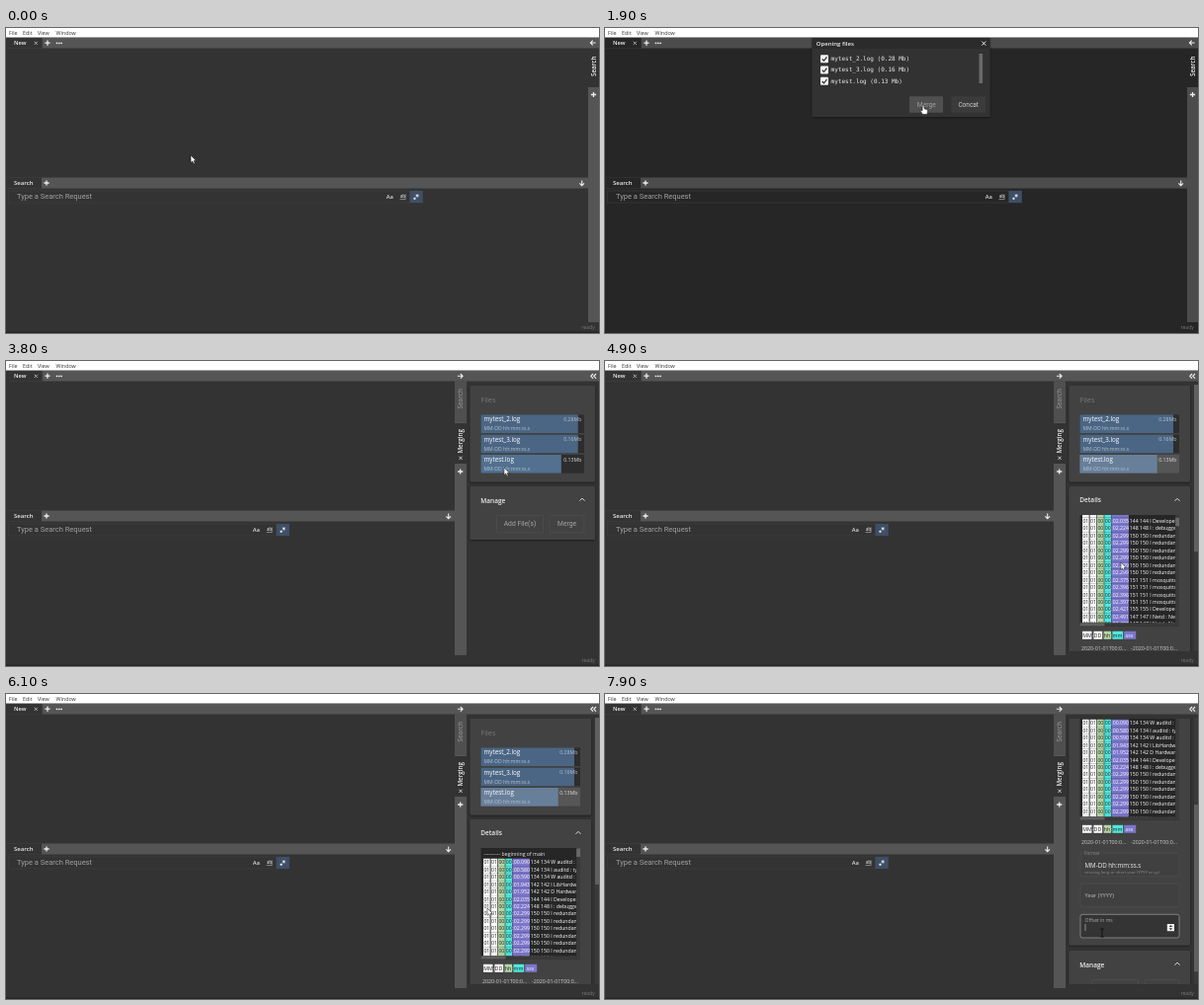
Write an HTML page that moves like this. It is 600 px wide and 309 px high and loops after 8 s.

```html
<!DOCTYPE html>
<html lang="en">
<head>
<meta charset="utf-8">
<title>Log merging</title>
<style>
html, body { margin: 0; width: 100%; height: 100%; overflow: hidden; background: #333; }
svg { display: block; width: 100vw; height: 100vh; }
text { font-family: "Open Sans", "Noto Sans", sans-serif; white-space: pre; }
.rb { font-family: Roboto, sans-serif; }
.mono { font-family: "DejaVu Sans Mono", monospace; }
</style>
</head>
<body>
<svg id="stage" viewBox="0 0 600 309" preserveAspectRatio="none">
  <defs>
    <clipPath id="panelClip"><rect x="467" y="25" width="133" height="269"/></clipPath>
    <clipPath id="logClip"><rect x="480.5" y="156" width="96.7" height="109.5"/></clipPath>
    <filter id="shadow" x="-10%" y="-10%" width="120%" height="125%">
      <feDropShadow dx="0" dy="1" stdDeviation="1.3" flood-opacity=".45"/>
    </filter>
  </defs>
  <g id="scene"></g>
</svg>
<script>
const LOOP = 8000, STEP = 100;
const scene = document.getElementById('scene');

// time, value(s) keyframes
const POINTER = [
  [0, 187, 129], [400, 272, 112], [800, 272, 112], [1600, 269, 102], [1900, 322, 78],
  [2700, 322, 78], [3500, 568, 80], [3700, 533, 114], [3800, 504, 108], [4000, 504, 108],
  [4800, 523, 206], [4900, 522, 204], [5700, 496, 216], [6100, 487, 217],
  [6800, 476.5, 210], [7500, 478, 212], [7900, 503, 242]
];
const LOG_SCROLL = [[4600, 0], [4900, 45.7], [5300, 130], [5800, 0]];
const PANEL_SCROLL = [[6200, 0], [6800, 94], [6900, 94], [7500, 141]];
const DIM = [[800, 0], [1100, 1]];

const ease = u => u * u * (3 - 2 * u);
function at(keys, t) {
  let i = keys.findIndex(k => k[0] > t);
  if (i < 0) return keys[keys.length - 1].slice(1);
  if (i === 0) return keys[0].slice(1);
  const a = keys[i - 1], b = keys[i], u = ease((t - a[0]) / (b[0] - a[0]));
  return a.slice(1).map((v, j) => v + (b[j + 1] - v) * u);
}

const rect = (x, y, w, h, fill, more = '') =>
  `<rect x="${x}" y="${y}" width="${w}" height="${h}" fill="${fill}" ${more}/>`;
// y is the middle of the line
const text = (s, x, y, size, fill, more = '') =>
  `<text x="${x}" y="${y + size * 0.36}" font-size="${size}" fill="${fill}" ${more}>${s}</text>`;
const line = (d, color = '#eee', w = 1, more = '') =>
  `<path d="${d}" fill="none" stroke="${color}" stroke-width="${w}" ${more}/>`;
const group = (s, attrs) => `<g ${attrs}>${s}</g>`;
const gray = v => `rgb(${v},${v},${v})`;
const semi = 'font-weight="600"';
const rb = 'class="rb"';

const plus = (x, y) => line(`M${x - 2.6} ${y}h5.2M${x} ${y - 2.6}v5.2`, '#eee', 1.3);
const cross = (x, y, r = 1.6, c = '#ddd') =>
  line(`M${x - r} ${y - r}l${2 * r} ${2 * r}m0 ${-2 * r}l${-2 * r} ${2 * r}`, c, 0.9);
const arrow = (x, y, turn) =>
  group(line('M-2.6 0h5.2M.3-2.3l2.3 2.3l-2.3 2.3', '#eee', 1.1), `transform="translate(${x} ${y}) rotate(${turn})"`);
const chevron = (x, y) => line(`M${x - 2.5} ${y + 1.3}l2.5-2.5l2.5 2.5`, '#ddd', 1);
const upText = (s, x, y, size, fill) =>
  group(text(s, 0, 0, size, fill, semi), `transform="translate(${x} ${y}) rotate(-90)"`);

function menuBar() {
  const items = [['File', 3], ['Edit', 17], ['View', 32], ['Window', 50.5]];
  return rect(0, 0, 600, 9.5, '#fff') + items.map(([s, x]) => text(s, x, 4.8, 5.4, '#333')).join('');
}

function searchBar(right, barEnd, bg, bar) {
  return rect(0, 151.5, barEnd, 11, bar) + rect(0, 151.5, 36, 11, bg) +
    text('Search', 8, 156.6, 6, '#eee', semi) + plus(41, 157) + arrow(barEnd - 6.3, 157, 90) +
    rect(2.5, 165, right - 2.5, 12, bg, 'stroke="#3e3e3e" stroke-width=".6"') +
    text('Type a Search Request', 11, 170.5, 7.5, '#a2a2a2', rb) +
    text('Aa', right - 37, 171.2, 5.8, '#ddd', semi) +
    text('ab', right - 23, 170.4, 4.6, '#ccc', semi) +
    line(`M${right - 23.2} 173.6h5.6v-5.2`, '#bbb', 0.6) +
    rect(right - 13.3, 165, 13.3, 12, '#3e4f66') +
    rect(right - 9.2, 171.8, 1.9, 1.9, '#fff') +
    line(`M${right - 5.6} 168.2v3.4M${right - 7.1} 169l3 1.7M${right - 4.1} 169l-3 1.7`, '#fff', 0.7);
}

function shell(open, dim) {
  const edge = open ? 454 : 589, bg = gray(51 - 13 * dim), bar = gray(85 - 9 * dim);
  let s = rect(0, 9.5, 600, 299.5, bg) + rect(0, 9.5, 600, 11, bar) + rect(0, 9.5, 36.7, 11, bg) +
    text('New', 8, 14.6, 5.8, '#eee', semi) + cross(30.3, 15.3, 1.6, '#bbb') + plus(42, 15.2) +
    [51.5, 53.8, 56.1].map(x => `<circle cx="${x}" cy="15.3" r=".9" fill="#eee"/>`).join('');
  s += searchBar(open ? 286.7 : 421.7, edge, bg, bar);
  if (open) {
    s += rect(454, 20.5, 12, 277.5, bar) + rect(454, 20.5, 12, 41.5, '#4f4f4f') + rect(454, 63, 12, 41, bg) +
      upText('Search', 460, 48.5, 6.3, '#8c8c8c') + upText('Merging', 460, 93.6, 6.2, '#eee') +
      cross(460, 98.3) + plus(459.7, 112) + arrow(459.5, 15.3, 0) +
      line('M594 13l-2.2 2.3l2.2 2.3M597 13l-2.2 2.3l2.2 2.3', '#eee', 1.2);
  } else {
    s += rect(589, 9.5, 11, 288.5, bar) + rect(589, 20.5, 11, 39.5, bg) +
      upText('Search', 595, 49, 6.3, '#eee') + plus(594.5, 67.5) + arrow(594, 15, 180);
  }
  return s + text('ready', 582.5, 303.6, 5.1, '#777') + rect(0, 307.6, 600, 1.4, '#262626');
}

function dialog(hover) {
  const files = ['mytest_2.log (0.28 Mb)', 'mytest_3.log (0.16 Mb)', 'mytest.log (0.13 Mb)'];
  let s = group(rect(209.5, 9.5, 180, 80.5, '#333'), 'filter="url(#shadow)"') +
    rect(209.5, 9.5, 180, 11.5, '#2b2b2b') +
    text('Opening files', 213.8, 15.4, 6, '#eee', semi) + cross(383.3, 15.6, 2, '#fff');
  files.forEach((f, i) => {
    const y = 31.2 + i * 11.3;
    s += rect(218, y - 4, 8, 8, '#f4f4f4', 'rx="1"') +
      line(`M219.7 ${y + 0.2}l1.8 1.8l3-3.8`, '#222', 1.1) + text(f, 228.6, y - 0.2, 6, '#eee', 'class="mono"');
  });
  return s + rect(378.5, 26, 3.6, 30, '#6a6a6a') +
    rect(308, 69.3, 34, 16.5, hover ? '#505050' : '#3b3b3b', 'rx="1"') +
    rect(350.5, 69.3, 34.5, 16.5, '#3b3b3b', 'rx="1"') +
    text('Merge', 315.8, 77.5, 6.7, hover ? '#a0a0a0' : '#ccc', rb) + text('Concat', 357.4, 77.5, 6.5, '#ccc', rb);
}

const card = (y, h, right) =>
  group(rect(469.5, y, right - 469.5, h, '#424242', 'rx="1.5"'), 'filter="url(#shadow)"');

function fileCard(right, picked, hover) {
  const w = right - 491.5, end = 480.5 + w;
  const rows = [['mytest_2.log', '0.28Mb', 0.94], ['mytest_3.log', '0.16Mb', 0.94], ['mytest.log', '0.13Mb', 0.778]];
  return card(24, 98.5, right) + text('Files', 480.5, 39.5, 7.2, '#7a7a7a') + rows.map(([name, size, part], i) => {
    const y = 54.4 + i * 20.3, last = i === 2;
    const fill = last && picked ? '#687f9a' : last && hover ? '#52708f' : '#4b6684';
    return rect(480.5, y, w, 18.6, last && picked ? '#565656' : '#2d2d2d') + rect(480.5, y, w * part, 18.6, fill) +
      text(name, 483.5, y + 4.6, 6.25, '#fff') + text('MM-DD hh:mm:ss.s', 483.5, y + 14.2, 5.1, '#b4c1cf') +
      text(size, end - 2.6, y + 4.8, 5.2, last ? '#ddd' : '#b4c0cc', 'text-anchor="end"');
  }).join('');
}

function manageCard(y, right) {
  const b = (x, w, s, size) => rect(x, y + 29.5, w, 17.3, 'none', 'rx="1" stroke="#4e4e4e" stroke-width=".8"') +
    text(s, x + w / 2, y + 38, size, '#a6a6a6', rb + ' text-anchor="middle"');
  return card(y, 54, right) + text('Manage', 480.3, y + 14.2, 6.5, '#eee', semi) + chevron(right - 13, y + 13.3) +
    b(right - 99.5, 47, 'Add File(s)', 6.8) + b(right - 45.8, 34.6, 'Merge', 6.7);
}

const LOG = [
  ['00.090', '134 134 W auditd :'], ['00.580', '134 134 I auditd : type'], ['00.590', '134 134 W auditd :'],
  ['01.943', '142 142 I LibHardware'], ['01.952', '142 142 D Hardware'],
  ['02.035', '144 144 I Developer'], ['02.224', '148 148 I : debuggerd'],
  ...Array(6).fill(['02.299', '150 150 I redundant']), ['02.375', '151 151 I mosquitto'],
  ['02.396', '151 151 I mosquitto'], ['02.396', '151 151 I mosquitto'], ['02.397', '151 151 I mosquitto'],
  ['02.421', '155 155 I Developer'],
  ...Array.from({ length: 22 }, (_, i) => ['02.' + (491 + i * 7), '147 147 I Netd : Netd'])
];
const WHITE = '#fafafa', GREEN = '#b4d5a4', CYAN = '#4fe8dc', PURPLE = '#7b76cb';
const COLS = [[483, WHITE, '01'], [490.6, WHITE, '01'], [498, GREEN, '00'], [505.3, CYAN, '00']];

function logView(scroll) {
  let s = text('---------- beginning of main', 483.5, 162.6 - scroll, 5.2, '#eee');
  LOG.forEach(([sec, msg], i) => {
    const y = 170.5 + i * 7.47 - scroll, ty = y - 0.2;
    if (y < 150 || y > 272) return;
    s += COLS.map(([x, c, v]) => rect(x, y - 3.75, 6.7, 7.5, c) + text(v, x + 0.4, ty, 5.2, '#222')).join('') +
      rect(512.4, y - 3.75, 17.5, 7.5, PURPLE) + text(':' + sec, 512.3, ty, 5.2, '#fff') +
      text(msg, 530.8, ty, 5.2, '#fff');
  });
  return rect(480.5, 156, 100.5, 112.5, '#262626') + group(s, 'clip-path="url(#logClip)"') +
    rect(577.2, 156, 3.8, 112.5, '#3a3a3a') + rect(577.2, 156.5 + scroll * 0.05, 3.8, 8.5, '#686868') +
    rect(480.5, 265.5, 96.7, 3, '#3a3a3a') + rect(480.5, 265.5, 25, 3, '#606060');
}

function detailsCard(scroll, focus) {
  const pills = [[483, 9.5, WHITE, 'MM'], [494.4, 8.8, WHITE, 'DD'], [504.6, 7.5, GREEN, 'hh'],
    [513.4, 10.8, CYAN, 'mm'], [525.2, 12, PURPLE, '.sss']];
  const box = (y, h) => rect(481, y, 100, h, '#404040', 'rx="2" stroke="#4d4d4d" stroke-width=".8"');
  let s = card(127, 268.5, 592) + text('Details', 480.3, 141, 6.5, '#eee', semi) + chevron(579, 140.5) +
    logView(scroll) + text('-', 492.5, 277.6, 5.3, '#eee') + text(':', 512, 277.6, 5.3, '#eee') +
    pills.map(([x, w, c, v], i) => rect(x, 273.8, w, 8, c) + text(v, x + 0.2, 277.6, 5.3, i > 3 ? '#fff' : '#222')).join('') +
    text('2020-01-01T00:0…', 482, 291.2, 5.3, '#ccc') + text('-2020-01-01T00:0…', 532, 291.2, 5.3, '#ccc') +
    box(302, 23.7) + rect(484, 301, 17.5, 2, '#424242') + text('Format', 485.3, 302.4, 4.5, '#8d8d8d') +
    text('MM-DD hh:mm:ss.s', 485.5, 314.8, 6.2, '#eee', 'font-weight="500"') +
    text('missing long or short year (YYYY or yy)', 485.5, 321.8, 4.25, '#8a8a8a') +
    box(333, 23.7) + text('Year (YYYY)', 485.5, 345, 5.75, '#bbb');
  if (!focus) return s + box(364, 23.7) + text('Offset in ms', 485.5, 376.2, 5.7, '#bbb');
  return s + rect(481, 364.3, 100, 23.7, '#343434', 'rx="2" stroke="#a0a0a0" stroke-width=".7"') +
    text('Offset in ms', 485.5, 370.2, 5, '#aaa') + line('M486 374v7', '#ccc', 0.6) +
    rect(568.8, 374, 7.2, 7.2, '#f2f2f2') +
    '<path d="M570.7 377l1.7-2l1.7 2zM570.7 378.3l1.7 2l1.7-2z" fill="#333"/>';
}

function panel(t) {
  const details = t >= 4300, right = details ? 592 : 596;
  const [scroll] = at(PANEL_SCROLL, t), [log] = at(LOG_SCROLL, t);
  const cards = fileCard(right, t >= 4100, t >= 3700) +
    (details ? detailsCard(log, t >= 7700) + manageCard(401, right) : manageCard(127, right));
  return group(group(cards, `transform="translate(0 ${-scroll})"`), 'clip-path="url(#panelClip)"') +
    (details ? rect(596, 24, 4, 270, '#3a3a3a') + rect(596, 24 + scroll * 0.625, 4, 169, '#606060') : '');
}

function pointer(t) {
  const [x, y] = at(POINTER, t);
  let shape;
  if (t >= 7700) shape = line('M-1.8-4h3.6M0-4v8M-1.8 4h3.6', '#111', 0.9);
  else if (t >= 1800 && t < 2900)
    shape = '<path d="M-.8.2q.9-1 1.6 0l.3 3.6l2.8.8q.9.4.7 1.6l-.6 3.2h-4.6l-2.4-3.4q-.2-1.2 1-.7l1 .7z" fill="#fff" stroke="#111" stroke-width=".6"/>';
  else shape = '<path d="M0 0v7.4l1.7-1.5l1.1 2.6l1.3-.6l-1.1-2.4h2.3z" fill="#fff" stroke="#111" stroke-width=".5"/>';
  return group(shape, `transform="translate(${x} ${y})"`);
}

function draw(t) {
  const open = t >= 2900, asking = t >= 800 && t < 2800;
  const dim = asking ? at(DIM, t)[0] : 0;
  scene.innerHTML = shell(open, dim) +
    (asking ? group(dialog(t >= 1800), `opacity="${dim}"`) : '') +
    (open ? panel(t) : '') + menuBar() + pointer(t);
}

const start = performance.now();
let shown = -1;
function tick() {
  const t = Math.floor(((performance.now() - start) % LOOP) / STEP) * STEP;
  if (t !== shown) draw(shown = t);
  requestAnimationFrame(tick);
}
tick();
</script>
</body>
</html>
```
